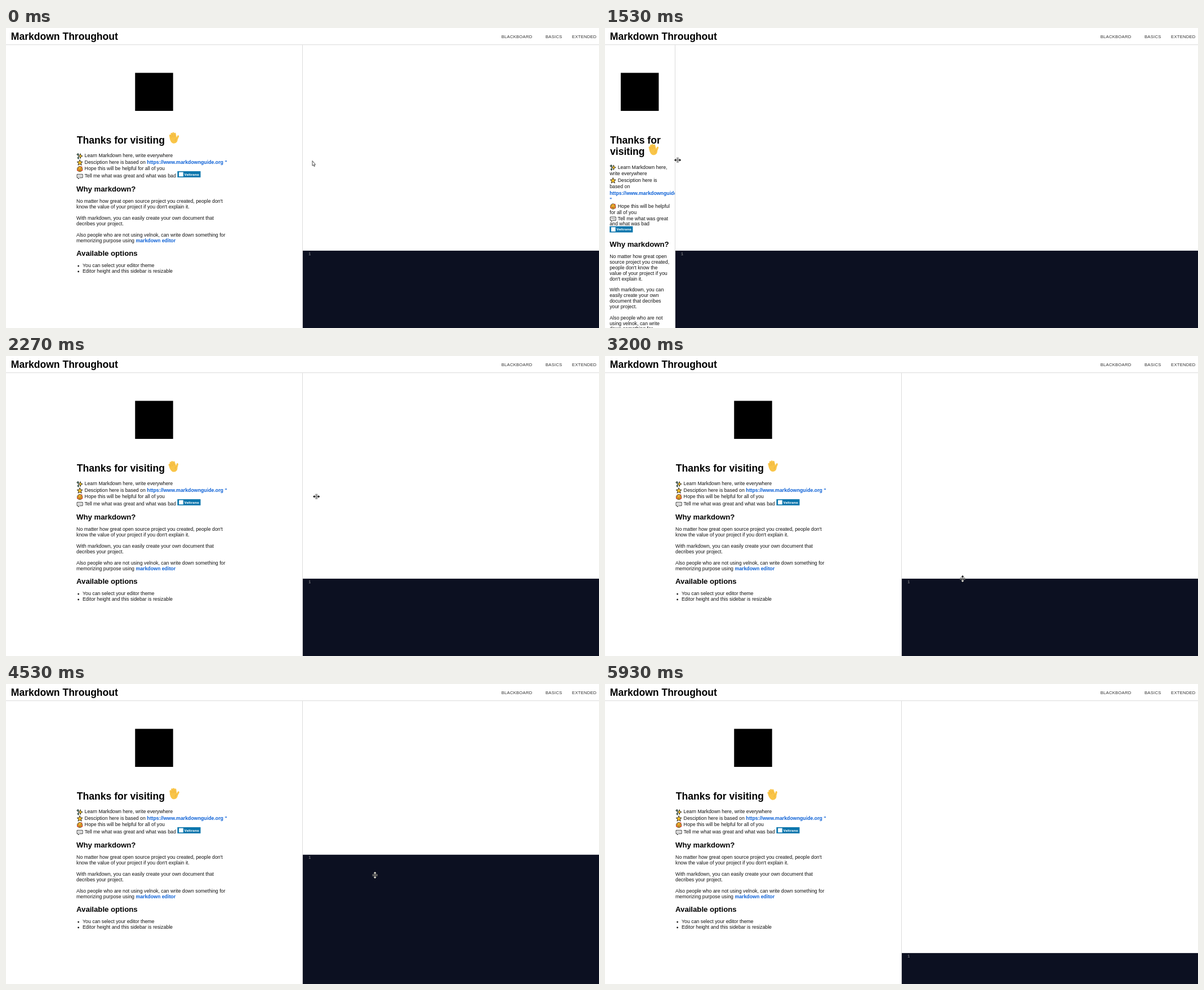
An HTML page that plays this animation: 1053x532 px, repeating every 5.99 s.

```html
<!DOCTYPE html>
<html lang="en">
<head>
<meta charset="utf-8">
<title>Markdown Throughout</title>
<style>
html, body { margin: 0; width: 100%; height: 100%; overflow: hidden; background: #fff; }
body { position: relative; font: 16px/18px "Liberation Sans", Arial, sans-serif; color: #111; }
#page { position: absolute; left: 0; top: 0; width: 1920px; height: 970px; overflow: hidden;
  transform: scale(.5484375); transform-origin: 0 0; }
header { position: absolute; left: 0; top: 0; width: 1920px; height: 53px; border-bottom: 2px solid #ddd; }
header b { position: absolute; left: 16px; top: 9.5px; font-size: 32px; line-height: 37px; color: #000; }
header nav { position: absolute; right: 8px; top: 19.5px; font-size: 14px; line-height: 16px; letter-spacing: .4px; color: #333; }
header nav span { margin-left: 32px; }
header nav span:nth-child(2) { margin-left: 43px; }
#side { position: absolute; left: 0; top: 55px; height: 915px; overflow: hidden;
  box-sizing: border-box; border-right: 2px solid #ddd; }
#column { margin: 0 auto; padding-top: 90px; }
#logo { width: 123px; height: 123px; margin: 0 auto 77.4px; background: #000; }
h1, h2, ul { margin: 0; color: #000; }
h1 { font-size: 32px; line-height: 37px; margin: 0 0 19.4px 1.5px; }
h2 { font-size: 24px; line-height: 27px; margin: 19.5px 0 18px; }
ul { padding-left: 20px; color: #111; }
.row { line-height: 21px; }
.row.last { line-height: 18px; }
.icon { position: relative; left: 1px; top: -1px; width: 20px; height: 20px;
  margin: -3px 2px -3px 0; vertical-align: -4px; overflow: visible; }
.link { font-weight: bold; color: #0b60d6; }
.badge { display: inline-block; box-sizing: border-box; width: 75px; height: 20px; margin-top: -1.4px; overflow: hidden;
  padding-left: 23px; background: #0b76ad; color: #fff; white-space: nowrap;
  font: bold 11px/20px "Open Sans", sans-serif; position: relative; }
.badge i { position: absolute; left: 5px; top: 3px; width: 14px; height: 14px; background: #fff; }
.wave { display: inline-block; position: relative; width: 44px; height: 1px; }
.wave svg { position: absolute; left: 2px; bottom: 0; width: 36.5px; height: 36.5px; overflow: visible; }
#editor { position: absolute; right: 0; bottom: 0; background: #0c1021; }
#editor span { position: absolute; left: 18px; top: 3px; color: #999;
  font: 13px/16px "Liberation Mono", monospace; }
.cursor { position: absolute; left: 0; top: 0; width: 1px; height: 1px; overflow: visible; }
#resizer { mix-blend-mode: difference; }
</style>
</head>
<body>
<div id="page">
  <div id="side">
    <div id="column">
      <div id="logo"></div>
      <h1>Thanks for visiting <span class="wave"><svg viewBox="0 0 20 20"><g id="hand"
        fill="none" stroke="#f9c549" stroke-linecap="round" stroke-width="3.2">
        <path d="M5.5 9V3M8.5 9V.5M11.6 9V0M14.5 9V1.5M15 13 19.2 7"/>
        <path fill="#f9c549" stroke="none" d="M3.9 8H16.1V11L17 13C16 17 13 18.2 10.5 18.2C6 18.2 3.9 14 3.9 8Z"/>
        <path d="M7 7V3M10 7V1.5M13.1 7V2.5M15.5 10.5C13 11 12.5 13 12.7 14.5" stroke="#e5a32f" stroke-width=".5"/>
      </g></svg></span></h1>
      <div class="row"><svg class="icon" viewBox="0 0 20 20" stroke="#111" stroke-width="1.4" stroke-linejoin="round">
        <path fill="#ffc928" d="M12 2 14 8 19 10 14 12 12 18 10 12 5 10 10 8Z"/>
        <path fill="#2fa66a" d="M4 1 5 4 8 5 5 6 4 9 3 6 0 5 3 4ZM5 12 6 15 8 16 6 17 5 20 4 17 2 16 4 15Z"/>
      </svg> Learn Markdown here, write everywhere</div>
      <div class="row"><svg class="icon" viewBox="0 0 20 20">
        <path fill="#ffc328" stroke="#111" stroke-width="1.5" stroke-linejoin="round"
          d="M10 1 12.6 7.3 19 7.8 14 12 15.7 18.5 10 15 4.3 18.5 6 12 1 7.8 7.4 7.3Z"/>
      </svg> Desciption here is based on <span class="link">https://www.markdownguide.org "</span></div>
      <div class="row"><svg class="icon" viewBox="0 0 20 20" stroke="#111" stroke-width="1.4">
        <circle cx="10" cy="10" r="8.4" fill="#ffb52e"/>
        <path fill="none" d="M5 8.5Q6.5 6 8 8.5M12 8.5Q13.5 6 15 8.5M6 12Q10 17 14 12"/>
        <g fill="#e5402f" stroke="none"><circle cx="3" cy="14" r="2.2"/><circle cx="17" cy="14" r="2.2"/><circle cx="16" cy="3.5" r="2"/></g>
      </svg> Hope this will be helpful for all of you</div>
      <div class="row last"><svg class="icon" viewBox="0 0 20 20">
        <path fill="#fff" stroke="#111" stroke-width="1.5" stroke-linejoin="round" d="M1 4H19V15H9L5 19V15H1Z"/>
        <path stroke="#111" stroke-width="2" stroke-dasharray="2 2" d="M5 9.5H15"/>
      </svg> Tell me what was great and what was bad <span class="badge"><i></i>Veltrano</span></div>
      <h2>Why markdown?</h2>
      <div>No matter how great open source project you created, people don't know the value of your project if you don't explain it.<br><br>
      With markdown, you can easily create your own document that decribes your project.<br><br>
      Also people who are not using velnok, can write down something for memorizing purpose using <span class="link">markdown editor</span></div>
      <h2>Available options</h2>
      <ul><li>You can select your editor theme</li><li>Editor height and this sidebar is resizable</li></ul>
    </div>
  </div>
  <div id="editor"><span>1</span></div>
  <header><b>Markdown Throughout</b>
    <nav><span>BLACKBOARD</span><span>BASICS</span><span>EXTENDED</span></nav>
  </header>
</div>
<svg class="cursor" id="arrow"><path d="M.5 .5V9.3L2.4 7.6 3.7 10.6 5 10 3.8 7.2H6Z" fill="#fff" stroke="#222" stroke-width=".8"/></svg>
<svg class="cursor" id="resizer"><g id="grip">
  <path d="M-1 -4.7V4.7M1 -4.7V4.7" stroke="#bbb"/>
  <path d="M-6 0 -3.2 -2.6V2.6ZM6 0 3.2 -2.6V2.6Z" fill="#fff"/>
  <path d="M-4 0H-1.5M1.5 0H4" stroke="#fff"/>
</g></svg>
<script>
const LOOP = 5990, FRAME = 1000 / 15, SCALE = 1053 / 1920, LAG = 36;
const GRAB_SIDE = 550, DROP_SIDE = 2420, GRAB_EDITOR = 3050, DRAG_EDITOR = 3500;
const $ = id => document.getElementById(id);
const clamp = (v, lo, hi) => Math.min(hi, Math.max(lo, v));

// eased progress from 0 to 1 between two times
function ease(t, from, to) {
  const p = clamp((t - from) / (to - from), 0, 1);
  return p * p * (3 - 2 * p);
}

const strokes = [
  { from: 70, to: 500, dx: -11, dy: 3 },
  { from: 600, to: 1137, dx: -408, dy: -4 },
  { from: 1480, to: 2386, dx: 448, dy: 16 },
  { from: DROP_SIDE, to: 3130, dx: 62.5, dy: 144.9 },
  { from: DRAG_EDITOR, to: 4130, dx: 19, dy: -344.9 },
  { from: 4130, to: 4850, dx: 2, dy: 490 },
];

function pointer(t) {
  const at = { x: 543.5, y: 235 };
  for (const { from, to, dx, dy } of strokes) {
    const p = ease(t, from, to);
    at.x += dx * p;
    at.y += dy * p;
  }
  return at;
}

// swings every 400 ms that fade to a rest, every two seconds
function waveAngle(t) {
  const p = (t + 500) % 2000;
  return (3 - 11 * Math.cos(Math.PI * p / 200)) * ease(p, 0, 200) * (1 - ease(p, 600, 1500));
}

function draw(t) {
  const { x, y } = pointer(t), late = pointer(t - LAG);
  const dragsSide = t > GRAB_SIDE && t < DROP_SIDE;
  const width = dragsSide ? clamp(late.x / SCALE, 100, 961) : 961;
  const height = t < DRAG_EDITOR ? 250 : clamp((532 - late.y) / SCALE, 100, 800);

  $('side').style.width = width + 'px';
  $('column').style.width = Math.min(503, width - 32) + 'px';
  $('editor').style.left = width + 'px';
  $('editor').style.height = height + 'px';
  $('hand').setAttribute('transform', `rotate(${waveAngle(t) - 14} 16 14.5)`);

  const isArrow = t < GRAB_SIDE - 100 || (t > DROP_SIDE && t < GRAB_EDITOR);
  $('arrow').style.display = isArrow ? '' : 'none';
  $('resizer').style.display = isArrow ? 'none' : '';
  $('arrow').style.transform = $('resizer').style.transform = `translate(${x}px,${y}px)`;
  $('grip').setAttribute('transform', t > DROP_SIDE ? 'rotate(90)' : '');
}

const start = performance.now();
function tick(now) {
  const t = Math.max(0, now - start) % LOOP;
  draw(Math.floor((t + 4) / FRAME) * FRAME);
  requestAnimationFrame(tick);
}
draw(0);
requestAnimationFrame(tick);
</script>
</body>
</html>
```
